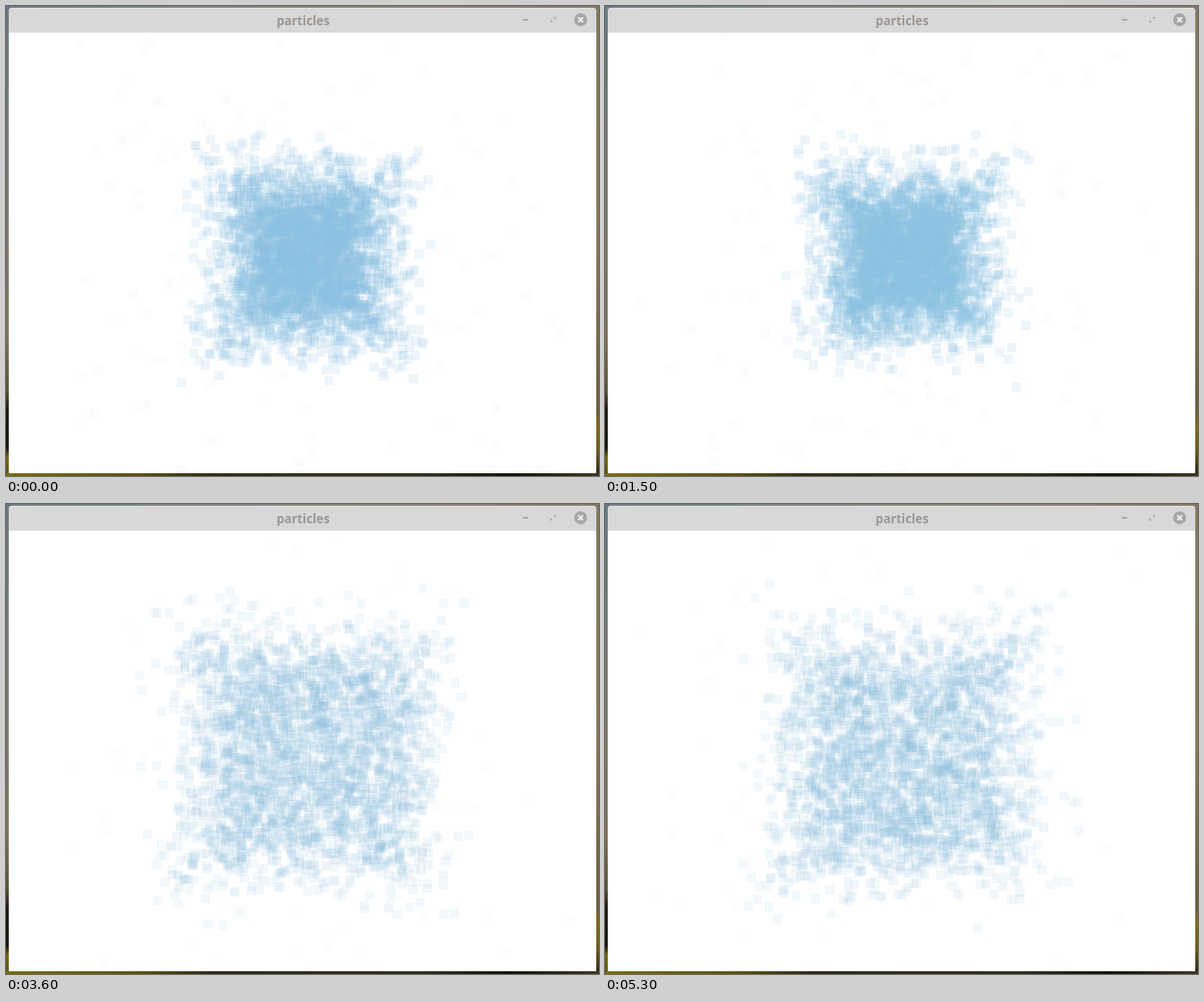
An HTML page with a canvas that plays this animation: 646x512 px, repeating every 5400 ms.

```html
<!DOCTYPE html>
<html lang="en">
<head>
<meta charset="utf-8">
<title>particles</title>
<style>
  html, body { margin: 0; width: 646px; height: 512px; overflow: hidden; background: #3a382c; }
  svg, canvas { position: absolute; left: 0; top: 0; display: block; }
  canvas { left: 3px; top: 29px; }
  text { font: bold 13.33px "Noto Sans", "Open Sans", sans-serif; }
</style>
</head>
<body>
<svg width="646" height="512" viewBox="0 0 646 512">
  <defs>
    <linearGradient id="top">
      <stop offset="0" stop-color="#6f8184"/>
      <stop offset=".5" stop-color="#8b8a80"/>
      <stop offset="1" stop-color="#8a7d66"/>
    </linearGradient>
    <linearGradient id="left" x2="0" y2="1">
      <stop offset="0" stop-color="#687b80"/>
      <stop offset=".35" stop-color="#7b7d74"/>
      <stop offset=".7" stop-color="#84765c"/>
      <stop offset=".82" stop-color="#5e5238"/>
      <stop offset=".86" stop-color="#1d1c13"/>
      <stop offset=".94" stop-color="#17170f"/>
      <stop offset=".96" stop-color="#75680f"/>
      <stop offset="1" stop-color="#5c5210"/>
    </linearGradient>
    <linearGradient id="right" x2="0" y2="1">
      <stop offset="0" stop-color="#857a64"/>
      <stop offset=".5" stop-color="#8c7c5c"/>
      <stop offset=".86" stop-color="#6e5e3d"/>
      <stop offset=".89" stop-color="#7e6d1d"/>
      <stop offset=".95" stop-color="#6b5d19"/>
      <stop offset="1" stop-color="#26241a"/>
    </linearGradient>
    <linearGradient id="bottom">
      <stop offset="0" stop-color="#7b6d12"/>
      <stop offset=".22" stop-color="#5d5313"/>
      <stop offset=".35" stop-color="#2f2c1a"/>
      <stop offset=".7" stop-color="#33301f"/>
      <stop offset=".85" stop-color="#15150f"/>
      <stop offset="1" stop-color="#3d3820"/>
    </linearGradient>
  </defs>
  <rect width="646" height="4" fill="url(#top)"/>
  <rect width="5" height="512" fill="url(#left)"/>
  <rect x="641" width="5" height="512" fill="url(#right)"/>
  <rect y="509" width="646" height="3" fill="url(#bottom)"/>
  <path d="M3 29V5q0-3 3-3H640q3 0 3 3V29z" fill="#d8d8d8"/>
  <path d="M5 2.5H641" stroke="#e3e3e3"/>
  <rect x="3" y="29" width="640" height="480" fill="#fff"/>
  <text x="323.7" y="21" text-anchor="middle" fill="#9c9794">particles</text>
  <rect x="563" y="14" width="6" height="2" fill="#aaa"/>
  <path d="M596 12h3v3zM593 15v3h3z" fill="#aaa"/>
  <circle cx="626" cy="15" r="7" fill="#a6a6a6"/>
  <path d="M623.4 12.4l5.2 5.2m0-5.2l-5.2 5.2" stroke="#f4f4f4" stroke-width="1.8"/>
</svg>
<canvas id="stage" width="640" height="480"></canvas>
<script>
const ctx = document.getElementById('stage').getContext('2d');
const STEP = 100, STEPS = 54;
const COUNT = 3600, EMIT = 0.28, REACH = 365, DRAG = 1.2, SIZE = 10;

// [step, burst clock]: one burst starts at every whole number
const CLOCK = [[0, 0.4], [9, 3.03], [15, 4.39], [23, 7.03], [36, 10.6], [46, 13.6], [54, 15.886]];

function burstClock(step) {
  const i = CLOCK.findIndex(k => k[0] > step);
  const [s0, c0] = CLOCK[i - 1], [s1, c1] = CLOCK[i];
  return c0 + (c1 - c0) * (step - s0) / (s1 - s0);
}

function random(seed) {
  let s = seed | 0;
  return () => {
    s = (s + 0x6D2B79F5) | 0;
    let n = Math.imul(s ^ (s >>> 15), 1 | s);
    n = (n + Math.imul(n ^ (n >>> 7), 61 | n)) ^ n;
    return ((n ^ (n >>> 14)) >>> 0) / 4294967296;
  };
}

function drawBurst(id, clock) {
  const rnd = random((id + 7) * 7919), old = clock - id;
  // colour greys a little as the burst ages
  ctx.fillStyle = `hsl(203, ${70 - 32 * old}%, ${74 - 8 * old}%)`;
  for (let i = 0; i < COUNT; i++) {
    const age = old - EMIT * rnd();
    const vx = rnd() * 2 - 1, vy = rnd() * 2 - 1;
    const speed = 0.62 + 0.45 * rnd();
    const life = 0.42 * Math.pow(rnd() + 1e-6, -1 / 3);
    if (age < 0 || age >= life) continue;
    const reach = REACH * speed * (1 - Math.exp(-DRAG * age));
    ctx.globalAlpha = 0.28 * Math.exp(-1.9 * age);
    ctx.fillRect(Math.round(320 + vx * reach), Math.round(240 + vy * reach), SIZE, SIZE);
  }
}

function draw(step) {
  const clock = burstClock(step), id = Math.floor(clock);
  ctx.globalAlpha = 1;
  ctx.fillStyle = '#fff';
  ctx.fillRect(0, 0, 640, 480);
  drawBurst(id - 1, clock);
  drawBurst(id, clock);
}

const start = performance.now();
let shown = -1;

function tick() {
  const step = Math.floor((performance.now() - start) / STEP) % STEPS;
  if (step !== shown) draw(shown = step);
  requestAnimationFrame(tick);
}
tick();
</script>
</body>
</html>
```
